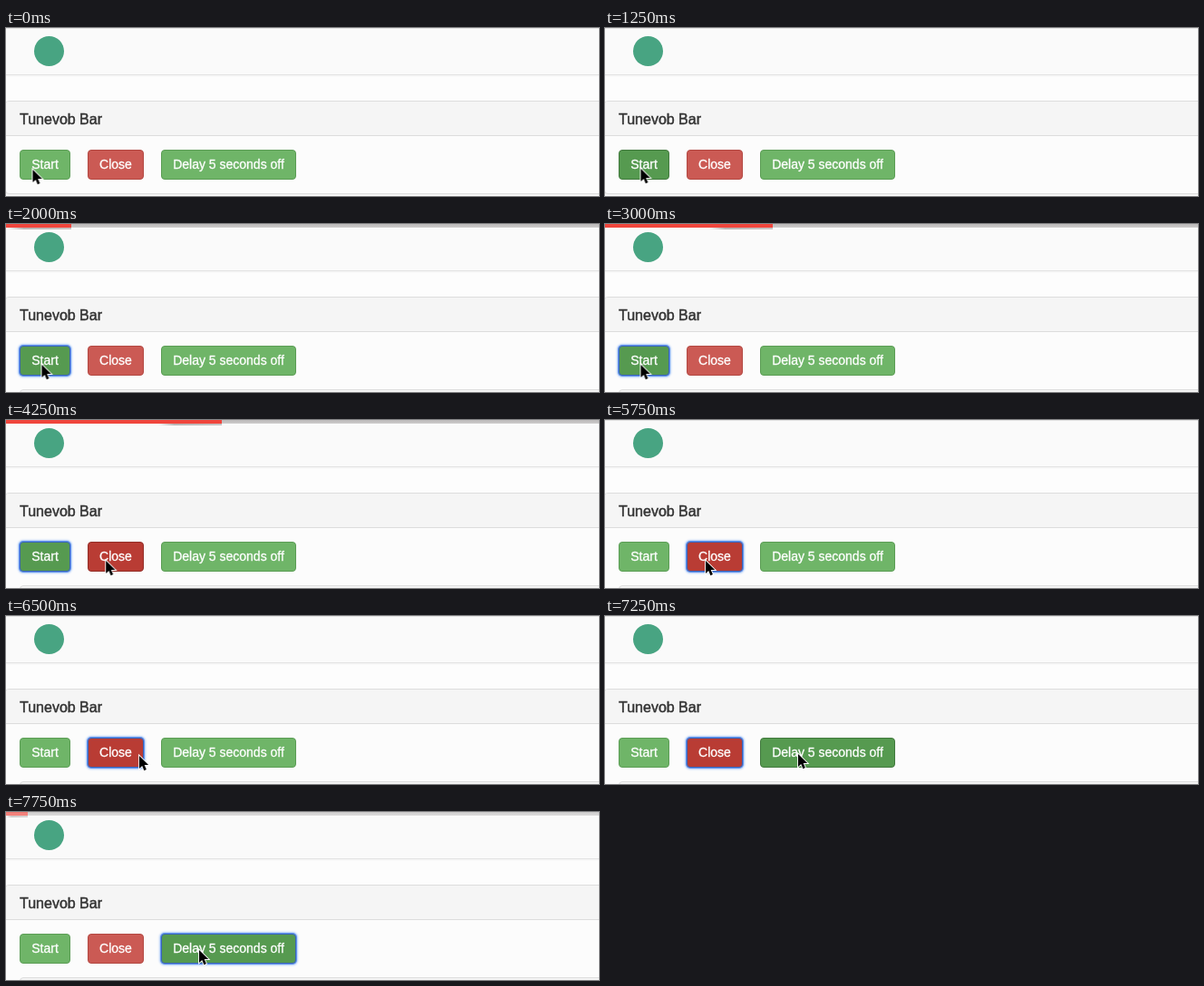
An HTML page for the animation above (8000 ms loop, 654x185 px).

```html
<!DOCTYPE html>
<html lang="en">
<head>
<meta charset="utf-8">
<title>Progress bar demo</title>
<style>
  html, body { margin: 0; width: 100%; height: 100%; overflow: hidden; background: #fdfdfd; }
  #stage {
    position: relative; width: 654px; height: 185px; overflow: hidden;
    font: 14px "Liberation Sans", Arial, sans-serif; color: #333;
  }
  #stage * { position: absolute; box-sizing: border-box; }
  nav {
    left: 0; top: 0; width: 100%; height: 52px; background: #fafafa;
    border: solid #e3e3e3; border-width: 1px 0; box-shadow: 0 1px 2px rgba(0, 0, 0, .05);
  }
  #logo { left: 30.5px; top: 8px; width: 33px; height: 33px; border-radius: 50%; background: #48a482; }
  .panel { border: 1px solid #ddd; border-radius: 4px; background: #fcfcfc; box-shadow: 0 1px 1px rgba(0, 0, 0, .05); }
  #panel { left: -1px; top: 80px; width: 690px; height: 103px; }
  #inner { left: 15px; top: 182px; width: 674px; height: 40px; background: #f5f5f5; }
  h3 {
    left: 0; top: 0; width: 100%; height: 38px; margin: 0; padding-left: 15px;
    border-bottom: 1px solid #ddd; border-radius: 3px 3px 0 0; background: #f5f5f5;
    font-size: 16px; font-weight: 400; line-height: 39px; -webkit-text-stroke: .45px #333;
  }
  .btn {
    top: 134px; height: 33px; border: 1px solid; border-radius: 4px;
    color: #fff; line-height: 31px; text-align: center; white-space: nowrap;
    -webkit-text-stroke: .3px #fff;
  }
  #start { left: 15px; width: 56px; }
  #close { left: 90px; width: 62px; }
  #delay { left: 171px; width: 149px; }
  #track { left: 0; top: 0; width: 100%; height: 4px; background: linear-gradient(#bdbbbb, #c6c4c4 75%, #d6d4d4); }
  #bar { left: 0; top: 0; height: 4px; background: #f0453c; }
  #peg { right: 0; top: 4px; width: 70px; max-width: 100%; height: 2px; background: linear-gradient(90deg, #b9b4b400, #b9b4b4 25%, #c9c4c4); }
  #cursor { left: 0; top: 0; overflow: visible; }
</style>
</head>
<body>
<div id="stage">
  <nav><div id="logo"></div></nav>
  <div id="panel" class="panel"><h3>Tunevob Bar</h3></div>
  <div id="inner" class="panel"></div>
  <div id="start" class="btn">Start</div>
  <div id="close" class="btn">Close</div>
  <div id="delay" class="btn">Delay 5 seconds off</div>
  <div id="track"><div id="bar"><div id="peg"></div></div></div>
  <svg id="cursor" width="12" height="18">
    <path d="M0 0V14L3.2 11 5.4 16.2 7.9 15.1 5.7 10.1H10.2Z" fill="#000" stroke="#fff" stroke-width="1.8" paint-order="stroke"/>
  </svg>
</div>
<script>
const LOOP = 8000, TICK = 250, WIDTH = 654;
const START = 1500, CLOSE = 5000, DELAY = 7500; // click times

const clamp = v => Math.min(1, Math.max(0, v));
const smooth = v => v * v * (3 - 2 * v);

// Samples a time-to-CSS rule once per tick and holds each value.
function play(id, rule) {
  const frames = [];
  for (let t = 0; t <= LOOP; t += TICK) {
    frames.push({ offset: t / LOOP, easing: 'step-end', ...rule(t) });
  }
  document.getElementById(id)
    .animate(frames, { duration: LOOP, iterations: Infinity }).startTime = 0;
}

const ring = (line, glow) => `0 0 0 1px ${line}, 0 0 2px 2px ${glow}`;
const green = { fill: '#6fb568', edge: '#5b9d55', darkFill: '#569a50', darkEdge: '#41793d' };
const red = { fill: '#cb5a54', edge: '#b34842', darkFill: '#b93c34', darkEdge: '#932e28' };

function button(id, color, hover, click, blur) {
  play(id, t => {
    const dark = t >= hover && t < blur;
    const focus = dark && t >= click;
    return {
      backgroundColor: dark ? color.darkFill : color.fill,
      borderColor: focus ? '#3a63b8' : dark ? color.darkEdge : color.edge,
      boxShadow: focus ? ring('#6496ee', '#b4cff8') : ring('#0000', '#0000')
    };
  });
}
button('start', green, 1250, START, CLOSE);
button('close', red, 4250, CLOSE, DELAY);
button('delay', green, 7000, DELAY, Infinity);

play('panel', t => ({ height: t < START ? '103px' : '160px' }));
play('inner', t => ({ opacity: t < START ? 0 : 1 }));

// Loading slows towards a limit; closing runs the bar to the end and fades it.
const age = t => t - (t < DELAY ? START : DELAY);
const trickle = ms => 263 * (1 - Math.exp(-.0009 * Math.max(0, ms - 145)));
const closing = t => t < DELAY ? t - CLOSE : -Infinity;

play('track', t => {
  const fadeIn = age(t) < 0 ? 0 : clamp((age(t) + 250) / 750);
  return { opacity: Math.min(fadeIn, clamp(1 - closing(t) / 750)) };
});
play('bar', t => {
  const w = trickle(age(t));
  return { width: w + (WIDTH - w) * clamp((closing(t) + 250) / 500) + 'px' };
});

const home = { x: 29.5, y: 156 };
const moves = [
  { from: 0, to: 250, x: 31.5, y: 157 },
  { from: 1000, to: 1250, x: 39.5, y: 155 },
  { from: 3500, to: 4300, x: 111, y: 155 },
  { from: 6000, to: 7250, x: 213, y: 152 }
];
play('cursor', t => {
  let { x, y } = home;
  for (const m of moves) {
    const k = smooth(clamp((t - m.from) / (m.to - m.from)));
    x += (m.x - x) * k;
    y += (m.y - y) * k;
  }
  return { transform: `translate(${x}px, ${y}px)` };
});
</script>
</body>
</html>
```
